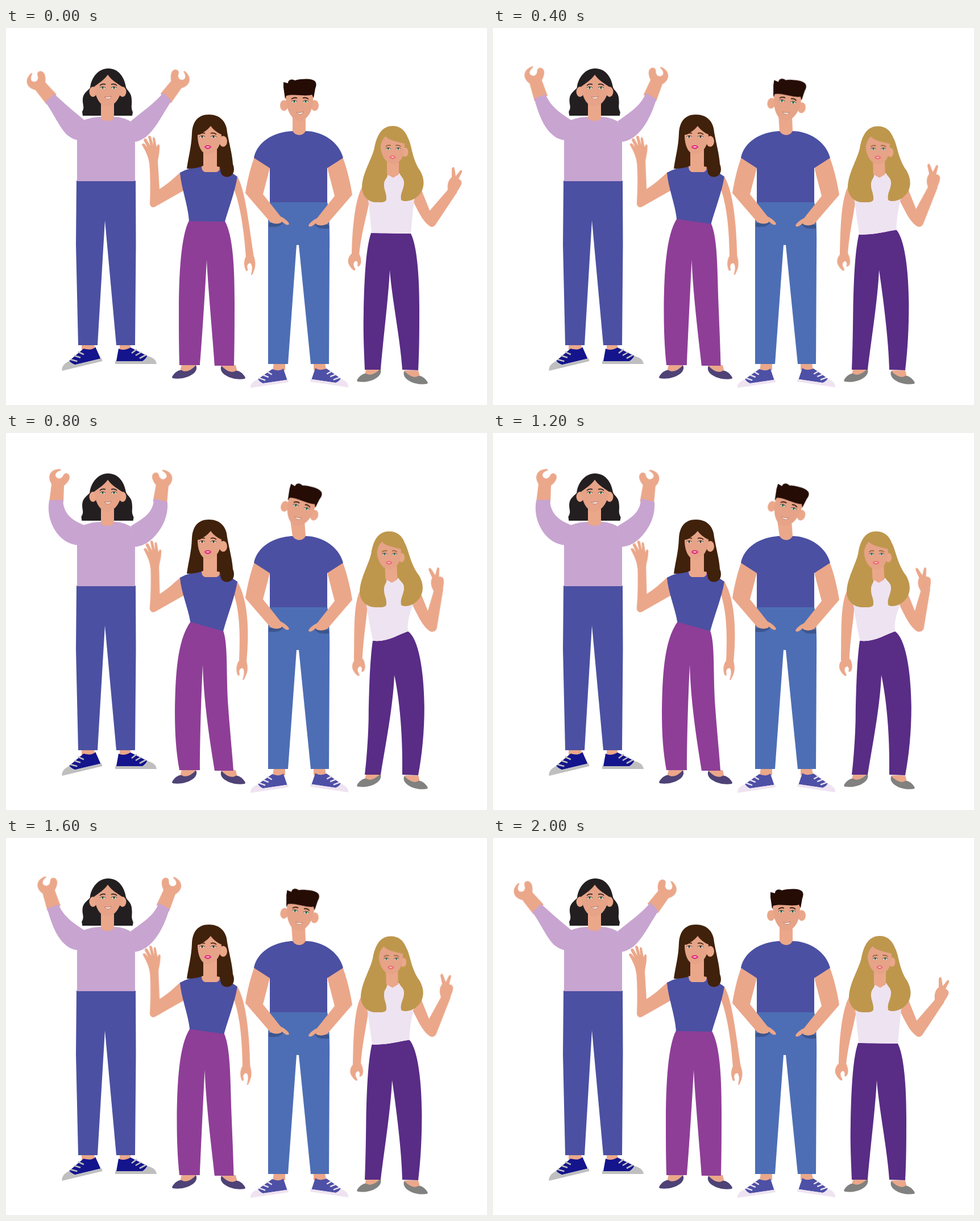
Recreate the animation shown at these times as an HTML page. Size 846 by 662 pixels, loop 2.1 s.

```html
<!DOCTYPE html>
<html lang="en">
<head>
<meta charset="utf-8">
<title>Four friends</title>
<style>
  html, body { margin: 0; width: 100%; height: 100%; overflow: hidden; background: #fff; }
  svg { display: block; width: 846px; height: 662px; }
  .skin { fill: #eba78a; }
  .face { fill: #e6a387; }

  /* Ten steps out, then eleven equal holds back, 100 ms each. */
  .morph, .move {
    animation: morph 2100ms steps(10) infinite;
  }
  .move { animation-name: move; }
  @keyframes morph {
    47.619% { d: var(--to); animation-timing-function: steps(11, jump-none); }
  }
  @keyframes move {
    47.619% { transform: var(--to); animation-timing-function: steps(11, jump-none); }
  }
</style>
</head>
<body>
<svg viewBox="0 0 846 662">
  <defs>
    <g id="shoe">
      <path fill="currentColor" d="M6 -27Q15 -22 27 -29L57 -14Q52 -7 48 -5H2Z"/>
      <path fill="var(--sole)" d="M0 -5H48Q53 -6 56 -14C66 -12 72 -8 73 0H0Z"/>
      <path fill="none" stroke="var(--sole)" stroke-width="2.6" d="M29 -19l9 -7M36 -15l10 -6M43 -10l11 -6"/>
    </g>
    <g id="flat">
      <path class="skin" d="M309 591H334L330 603Q318 610 306 603Z"/>
      <path fill="currentColor" d="M292 613C296 605 304 600 309 601C317 606 327 600 334 592C337 598 334 604 328 608C318 615 304 617 293 615Z"/>
    </g>
    <path id="claw" d="M-12 4L-8 -28C-15 -38 -13 -52 3 -54Q9 -55 9 -52C2 -50 -1 -47 -1 -43C1 -36 9 -36 12 -42C14 -47 18 -48 22 -45C26 -40 24 -33 14 -25L13 4Z"/>
    <g id="eye">
      <ellipse rx="4.200" ry="1.900" fill="#e9e4dc"/>
      <circle r="1.900" fill="currentColor"/>
      <circle r=".8" fill="#111"/>
      <path d="M-5 0Q0 -4 5 0" fill="none" stroke="#2a2220" stroke-width=".9"/>
    </g>
    <g id="eyes">
      <use href="#eye" x="-10"/>
      <use href="#eye" x="10"/>
      <path d="M-15 -4Q-11 -8 -5 -6M5 -6Q11 -8 15 -4" fill="none" stroke="var(--brow)" stroke-width="1.6"/>
    </g>
    <path id="smile" d="M-6 -1Q0 1 6 -2Q4.500 2.500 0 2.500Q-4 2.500 -6 -1Z" fill="#fff" stroke="#b8705c" stroke-width=".9"/>
    <g id="lips">
      <path fill="currentColor" d="M-6.500 0Q-3 -4.500 0 -3Q3 -4.500 6.500 0Q0 7 -6.500 0Z"/>
      <path fill="#fff" d="M-4 -.5Q0 -1.500 4 -.5Q0 2 -4 -.5Z"/>
    </g>
    <g id="pocketArm">
      <path fill="#3b568f" d="M462 343L485 338Q489 338 487 342Q482 351 462 349Z"/>
      <path class="skin" d="M464 236L464 246L452 292L483 331C490 334 497 340 498 344Q497 347 492 345L485 340L484 342Q475 346 465 341L421 290C424 270 430 245 437 226L444 216Z"/>
    </g>
  </defs>

  <!-- Woman with raised arms -->
  <g>
    <path class="skin" d="M133 556H155L157 566Q145 574 133 566ZM200 556H219V564Q208 572 200 564Z"/>
    <path fill="#4b50a2" d="M124 268H228L228.500 380L227 557H194L174 338L161 557H127L123 380Z"/>
    <g color="#14148c" style="--sole:#bfbfbf">
      <use href="#shoe" transform="translate(169.500 585) scale(-1 1) rotate(13.500)"/>
      <use href="#shoe" transform="translate(192 590)"/>
    </g>
    <use href="#claw" class="skin move" style="transform:translate(77px,123px) rotate(-45deg);--to:translate(90.800px,116.100px) rotate(11.200deg)"/>
    <use href="#claw" class="skin move" style="transform:translate(284px,121px) rotate(42deg) scale(-1,1);--to:translate(269px,118.500px) rotate(5deg) scale(-1,1)"/>
    <g fill="#c8a4d0">
      <path class="morph" d="M138 162C121 148 101 131 85 116L69 130C85 151 97 182 112 191C116 194 121 196 126 197Z"
        style="--to:path('M138 162C122 157 101 150 103.800 117.300L77.800 115C68.800 137 73 157 88 177C100 190 110 195 126 197Z')"/>
      <path class="morph" d="M219 164C238 148 262 132 277 113L291 128C275 152 261 181 245 192C239 196 233 199 226 200Z"
        style="--to:path('M219 164C237 153 259.500 144.500 255.800 115.500L282 119C289 141 280 163.500 262.500 182C251.500 193.500 239 199 226 200Z')"/>
      <path d="M125 269V197L136 162C146 158 157 156 167 156H190C200 156 211 159 219 164L227 200V269Z"/>
    </g>
    <path class="morph" fill="#231f21" d="M180 71C163 71 150 86 148 105C146 109 136 113 135 124C134 135 139 138 134 147L135 154L222 154L223 148C219 138 222 136 221 126C221 113 213 110 211 104C208 85 197 71 180 71Z"
      style="--to:path('M179 71C163 71 149 86 147 105C145 109 135 113 134 124C133 135 138 138 132 147L133 154L224 154L225 148C220 138 223 136 222 126C222 113 213 110 211 104C208 85 197 71 179 71Z')"/>
    <path class="skin" d="M167 128H190V157C188 165 169 165 167 157Z"/>
    <ellipse class="skin" cx="153" cy="112" rx="6.500" ry="9"/>
    <ellipse class="skin" cx="205" cy="112" rx="6.500" ry="9"/>
    <path class="face" d="M179 82C173 91 163 97 155 103C157 120 164 137 178 138C193 137 202 120 204 103C195 97 186 92 179 82Z"/>
    <use href="#eyes" x="180" y="105" color="#3f8558" style="--brow:#231f21"/>
    <use href="#smile" x="179" y="122"/>
  </g>

  <!-- Waving woman -->
  <g>
    <g color="#4e4276">
      <use href="#flat"/>
      <use href="#flat" transform="matrix(-1 0 0 1 713 1)"/>
    </g>
    <path class="skin" d="M307 253C295 264 282 276 268 284L253 309Q255 317 262 314L315 284Z"/>
    <g class="skin move" style="transform-origin:260px 300px;--to:rotate(2.400deg)">
      <path d="M252 234C254 260 254 285 253 309Q256 316 263 312L270 284L267 234Z"/>
      <path d="M252 238C251 228 247 220 244 214L239 205Q240 201 244 204L249 210L242 197Q243 192 247 195L254 207L250 191Q252 187 255 191L259 206L258 193Q260 190 262 194L265 209Q266 205 268 204Q271 205 270 211C270 222 267 228 267 238Z"/>
    </g>
    <path class="skin morph" d="M407 261C421 285 427 345 436 402L422 403C419 360 413 315 401 283Z"
      style="--to:path('M407 261C424.800 291 429.500 339 419.800 402L407 402C410 360 412 321 401 283Z')"/>
    <path class="skin move" style="transform-origin:429px 402px;transform:translate(0,0) rotate(0);--to:translate(-16px,0) rotate(5deg)"
      d="M422 401C418 408 418 418 422 426Q426 428 425 423C423 418 425 413 430 413C434 417 433 425 431 433Q433 435 435 429C440 418 439 410 436 401Z"/>
    <path class="morph" fill="#8e3e97" d="M322 338L385 339C398 363 402 410 402 480C402 510 402 550 401 593L367 593C365 560 355 450 353 407C351 450 344 560 341 592L305 592C304 560 304 530 304 500C304 430 308 365 322 338Z"
      style="--to:path('M325.800 329L381.300 349C389 374 383 422 388 480C391 516 396 556 399.800 593L367 593C361 560 346 487 344.300 407C341 470 340 550 341 592L305 592C298 560 295.300 530 295.300 487C296.500 430 298 365 325.800 329Z')"/>
    <path class="morph" fill="#4b50a2" d="M306 254Q325 244 344 242L375 243Q393 251 407 261C402 290 392 315 385 340L322 339C320 310 308 280 306 254Z"
      style="--to:path('M306 254Q325 244 344 242L375 243Q393 251 407 261C402 290 391 315 381.300 350L324.800 330C320 305 308 280 306 254Z')"/>
    <path fill="#40210b" d="M357 152C337 152 328 165 327 185C326 210 321 225 318 247Q336 247 347 242L371 247H377C376 260 386 263 392 261C401 259 403 248 399 239C398 222 393 205 389 183C388 164 376 152 357 152Z"/>
    <path class="skin" d="M347 205H371V243L376 244Q376 252 370 253H350Q344 251 344 243L347 242Z"/>
    <ellipse class="skin" cx="382" cy="199" rx="7" ry="9.500"/>
    <path class="face" d="M360 172C354 180 345 185 337 188C337 205 343 221 355 222C369 222 379 205 379 187C372 184 365 179 360 172Z"/>
    <use href="#eyes" x="355" y="191" color="#5b5544" style="--brow:#40210b"/>
    <use href="#lips" x="355" y="209" color="#e22a78"/>
  </g>

  <!-- Man with hands in pockets -->
  <g>
    <path class="skin" d="M471 588H491V601H469ZM541 588H561L563 601H541Z"/>
    <path fill="#4d6eb5" d="M464 305H565C568 320 570 350 569 400L568 590H536L515 381H511L496 590H461V350Q461 320 464 305Z"/>
    <g color="#4d50a5" style="--sole:#efe3f1">
      <use href="#shoe" transform="translate(497 622) scale(-.93 .93) rotate(8.500)"/>
      <use href="#shoe" transform="translate(535 621) scale(.93) rotate(8.500)"/>
    </g>
    <use href="#pocketArm"/>
    <use href="#pocketArm" transform="matrix(-1 0 0 1 1030 3)"/>
    <path fill="#4b50a2" d="M504 181C470 182 441 201 436 228L464 246V306H565V246L593 228C586 200 556 181 527 181Z"/>
    <path class="skin morph" d="M504 148L527 148L527 181Q523 188 516 188Q508 188 504 181Z"
      style="--to:path('M498 148L524 148L527 181Q523 188 516 188Q508 188 504 181Z')"/>
    <g class="move" style="transform-origin:516px 148px;transform:translate(0,0) rotate(0);--to:translate(-4px,0) rotate(21deg)">
      <ellipse class="skin" cx="489" cy="136" rx="7" ry="9.500"/>
      <ellipse class="skin" cx="543" cy="136" rx="7" ry="9.500"/>
      <path class="face" d="M492 116H540C542 140 533 162 516 163C501 162 491 140 492 116Z"/>
      <path fill="#250c05" d="M491 125L488 104L488 95L496 97C496 91 502 89 508 92C520 89 532 89 539 91C546 93 547 99 544 106L541 123L538 117C526 121 508 115 493 119Z"/>
      <use href="#eyes" x="517" y="129" color="#1f8f68" style="--brow:#250c05"/>
      <use href="#smile" x="517" y="149"/>
    </g>
  </g>

  <!-- Woman with a victory sign -->
  <g>
    <g color="#81817f">
      <use href="#flat" transform="translate(331 15) scale(.98 .985)"/>
      <use href="#flat" transform="matrix(-.98 0 0 .985 1028 19)"/>
    </g>
    <path class="skin morph" d="M627 278C614 300 609 350 608 398L621 399C624 365 633 335 639 305Z"
      style="--to:path('M620 280C610 306 614 350 613 400L628 400C629 365 633 335 635 305Z')"/>
    <path class="skin move" style="transform:translate(0,0);--to:translate(9px,1px)"
      d="M608 396C601 402 600 411 604 417Q608 424 613 426Q616 425 613 421C610 415 611 410 616 409C619 411 619 414 618 418Q620 420 623 416C626 410 624 402 621 396Z"/>
    <path class="skin" d="M714 294L731 285L745 320L755 345Q750 352 744 347C732 338 724 320 714 300Z"/>
    <g class="skin move" style="transform-origin:749px 338px;--to:rotate(-30.500deg)">
      <path d="M745 321L778 283L793 289L755 346Q749 353 743 345Z"/>
      <path d="M777 285C776 276 777 268 784 262L784 247Q787 241 789 247L791 260L799 250Q803 248 802 253L796 265Q803 268 801 274C798 282 794 285 792 291Z"/>
    </g>
    <path class="morph" fill="#592c86" d="M642 360C665 360 690 361 712 361C722 380 727 430 727 490C727 530 727 565 725 601L697 600C694 550 678 470 675 425C673 470 663 550 659 600L631 600C630 570 628 540 629 500C630 450 632 390 642 360Z"
      style="--to:path('M645.800 366C671 370 690 352 705.800 345C726 355 737 411 738 478C738 524 733 565 725 601L697 600C699 550 699 482 685 425C683 482 668 550 659 600L631 600C636 570 640.500 515 640 487C641 450 642 402 645.800 366Z')"/>
    <path class="morph" fill="#eee3f1" d="M636 295L670 256L692 256L719 295C716 315 714 340 712 361C690 361 665 360 643 360C641 340 639 315 636 295Z"
      style="--to:path('M632 295L667 256L690 256L718 295C707 319 703 334 706 345C690 352 671 370 646 366C641 346 636 321 632 295Z')"/>
    <path class="morph" fill="#be974d" d="M680 172C660 172 652 190 648 210C644 230 626 255 626 280C627 298 640 306 650 306C658 306 668 307 669 301C670 290 664 284 665 274C665 266 671 264 671 258L692 255C695 262 701 264 700 274C699 285 693 290 695 302C702 307 722 303 731 287C737 275 735 262 728 250C714 230 714 205 707 193C702 180 694 172 680 172Z"
      style="--to:path('M672 173C652 173 644 191 641 211C637 231 621 256 621 281C623 298 637 306 648 306C658 306 668 307 669 301C670 290 664 284 665 274C665 266 669 264 669 258L690 255C694 262 701 264 700 274C699 285 693 290 695 302C702 307 720 303 729 287C735 275 733 262 726 250C710 230 707 205 700 193C695 180 686 173 672 173Z')"/>
    <path class="skin morph" d="M670 228L691 228L691 257L681 263L670 257Z"
      style="--to:path('M665 228L686 228L688 257L678 263L667 257Z')"/>
    <g class="move" style="transform:translate(0,0);--to:translate(-8px,1px)">
      <ellipse class="skin" cx="702" cy="218" rx="5.500" ry="8"/>
      <path class="face" d="M668 190C672 197 690 200 701 203C702 222 695 238 681 239C666 238 659 220 659 208C660 200 663 194 668 190Z"/>
      <use href="#eyes" transform="translate(681 212) scale(.88 .95)" color="#2f8d6e" style="--brow:#8a5a2c"/>
      <use href="#lips" transform="translate(680 227) scale(.9)" color="#f0626e"/>
    </g>
  </g>
</svg>
</body>
</html>
```
